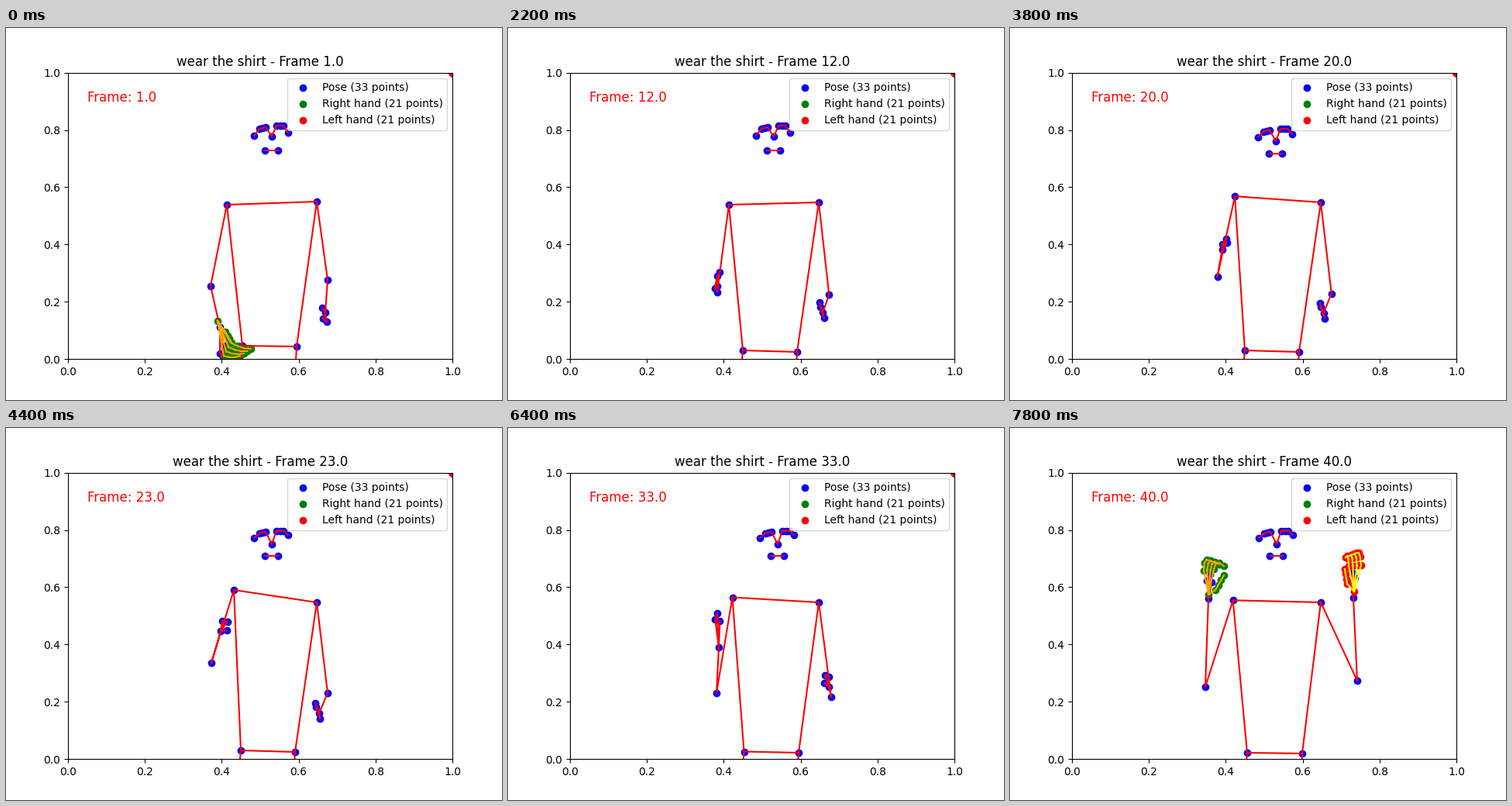
Write a matplotlib script that moves like this. It is 640 by 480 pixels and loops after 8 s.

```python
import numpy as np
import matplotlib.pyplot as plt
from matplotlib.animation import FuncAnimation

FRAMES, INTERVAL = 40, 200

# Face at rest in stage pixels: x, y and how far a nod lowers the point.
NOSE = (343, 140, 10)
EYES = [((349, 126, 6.5), (358, 126, 6.5)), ((335, 128, 6), (327, 130, 6))]
EARS = [(364, 135, 3), (320, 139, 3)]
MOUTH = [(351, 158, 7), (334, 158, 7)]

# Arm key poses by frame: elbow, wrist, palm vector, tilt of thumb over pinky.
RIGHT_ARM = {
    0: (264, 333, 276, 386, 4, 38, -5),
    7: (269, 336, 271, 347, -1, -9, -10),
    15: (271, 345, 269, 319, 1, -18, -11),
    22: (265, 303, 277, 262, 9, -12, 6),
    28: (270, 319, 286, 274, 16, -29, 7),
    32: (269, 342, 272, 283, -2, -44, 1),
    36: (252, 334, 256, 220, 2, -31, 1),
}
LEFT_ARM = {
    0: (415, 325, 412, 367, -3, 8, -9),
    7: (414, 345, 407, 367, -3, -7, -10),
    22: (415, 342, 404, 368, -4, -8, -10),
    28: (417, 341, 406, 363, -7, -4, -10),
    32: (417, 347, 414, 334, -5, -15, 4),
    36: (448, 326, 443, 219, -1, -32, 3),
}

# Root offset from the pose wrist, then relative to that root: thumb base and
# tip, index and pinky base, index and pinky tip, outward bend of the fingers.
HAND_LOW = [(-3, -8), (10, 14), (18, 28), (17, 28), (8, 45), (43, 36), (29, 45), (0, 2)]
HAND_CHEST = [(-1, -15), (13, -16), (25, -41), (12, -48), (-2, -43), (28, -52), (16, -44), (-2, -5)]
HAND_UP = [(0, -5), (9, -6), (20, -25), (7, -33), (-6, -31), (20, -37), (2, -44), (-2, -6)]
LEFT_UP = [(1, -8), (-9, -10), (-12, -29), (-7, -33), (9, -34), (-11, -44), (3, -50), (1, -6)]

# first and last frame in which a hand is detected
RIGHT_SPANS = [(0, 2, HAND_LOW), (24, 29, HAND_CHEST), (34, 39, HAND_UP)]
LEFT_SPANS = [(35, 39, LEFT_UP)]

POSE_BONES = [
    (0, 1), (1, 2), (2, 3), (3, 7), (0, 4), (4, 5), (5, 6), (6, 8), (9, 10),
    (11, 12), (11, 23), (12, 24), (23, 24), (23, 25), (24, 26)]
for s in (0, 1):
    POSE_BONES += [(a + s, b + s) for a, b in (
        (11, 13), (13, 15), (15, 17), (15, 19), (15, 21), (17, 19))]
HAND_BONES = [(0 if k % 4 == 1 else k - 1, k) for k in range(1, 21)]


def ramp(i, start, end):
    t = np.clip((i - start) / (end - start), 0, 1)
    return t * t * (3 - 2 * t)


def mix(a, b, t):
    return np.add(a, np.subtract(b, a) * t)


def face_at(i):
    nod = ramp(i, 15, 22)
    sway = np.interp(i, [22, 28, 32, 39], [0, 1, 5, 1])

    def place(p):
        return np.array([p[0] + sway, p[1] + p[2] * nod])

    pts = [place(NOSE)]
    for inner, outer in EYES:
        a, b = place(inner), place(outer)
        pts += [a, (a + b) / 2, b]
    return pts + [place(p) for p in EARS + MOUTH]


def arm_at(i, keys, side):
    """Elbow, wrist, pinky, index and thumb."""
    ex, ey, wx, wy, px, py, tilt = (
        np.interp(i, list(keys), col) for col in zip(*keys.values()))
    wrist, palm = np.array([wx, wy]), np.array([px, py])
    size = np.hypot(px, py)
    middle = wrist + palm * size / (size + 12)
    spread = np.array([3 * side, tilt])
    return [np.array([ex, ey]), wrist, middle - spread, wrist + palm, middle + spread]


def pose_at(i):
    lift = np.interp(i, [15, 22, 28, 32, 39], [0, 1, 0.85, 0.5, 0.3])
    stoop = 1 - ramp(i, 0, 7)
    turn = ramp(i, 28, 36)
    shoulders = [(401, 225 - stoop), (285 + 9 * lift, 228 - 19 * lift)]
    hips = [np.array([373 + 4 * turn + 2 * stoop, 418 + 2 * turn - 7 * stoop]),
            np.array([303 + 3 * turn + 2 * stoop, 416 + 3 * turn - 6 * stoop])]
    knees = [hips[0] + (-6, 110), hips[1] + (-10, 110)]
    sides = zip(arm_at(i, LEFT_ARM, -1), arm_at(i, RIGHT_ARM, 1))
    arms = [p for pair in sides for p in pair]
    return np.array([*face_at(i), *shoulders, *arms, *hips, *knees])


def hand_shape(thumb, thumb_tip, index, pinky, index_tip, pinky_tip, bend):
    """Wrist at the origin, a straight thumb and four evenly spread fingers."""
    steps = np.linspace(0, 1, 4)
    pts = [np.zeros(2)] + [mix(thumb, thumb_tip, t) for t in steps]
    for f in steps:
        base, tip = mix(index, pinky, f), mix(index_tip, pinky_tip, f)
        pts += [mix(base, tip, t) + np.multiply(bend, 4 * t * (1 - t)) for t in steps]
    return np.array(pts)


def hand_at(i, spans, wrist):
    for first, last, (root, *shape) in spans:
        if first <= i <= last:
            return hand_shape(*shape) + wrist + root
    return None


def to_data(px):
    return (px - (80, 427.2)) / (496, -369.6)


def segments(pts, bones):
    gap = np.full(2, np.nan)
    return np.array([q for a, b in bones for q in (pts[a], pts[b], gap)]).T


fig, ax = plt.subplots(figsize=(6.4, 4.8), dpi=100)
ax.set_xlim(0, 1)
ax.set_ylim(0, 1)


def layer(dot, line, label):
    dots = ax.scatter([], [], c=dot, label=label)
    bones, = ax.plot([], [], color=line)
    return dots, bones


pose = layer("blue", "red", "Pose (33 points)")
right_hand = layer("green", "orange", "Right hand (21 points)")
left_hand = layer("red", "yellow", "Left hand (21 points)")
ax.legend(loc="upper right")
title = ax.set_title("")
counter = ax.text(0.05, 0.9, "", fontsize=12, color="red")


def show(parts, px, bones):
    dots, line = parts
    if px is None:
        # an undetected hand collapses into the corner
        dots.set_offsets(np.ones((21, 2)))
        line.set_data([], [])
        return
    pts = to_data(px)
    dots.set_offsets(pts)
    line.set_data(*segments(pts, bones))


def update(i):
    body = pose_at(i)
    show(pose, body, POSE_BONES)
    show(right_hand, hand_at(i, RIGHT_SPANS, body[16]), HAND_BONES)
    show(left_hand, hand_at(i, LEFT_SPANS, body[15]), HAND_BONES)
    title.set_text(f"wear the shirt - Frame {i + 1:.1f}")
    counter.set_text(f"Frame: {i + 1:.1f}")
    return [*pose, *right_hand, *left_hand, title, counter]


anim = FuncAnimation(fig, update, frames=FRAMES, interval=INTERVAL,
                     repeat=True, repeat_delay=0, blit=False)
plt.show()
```
